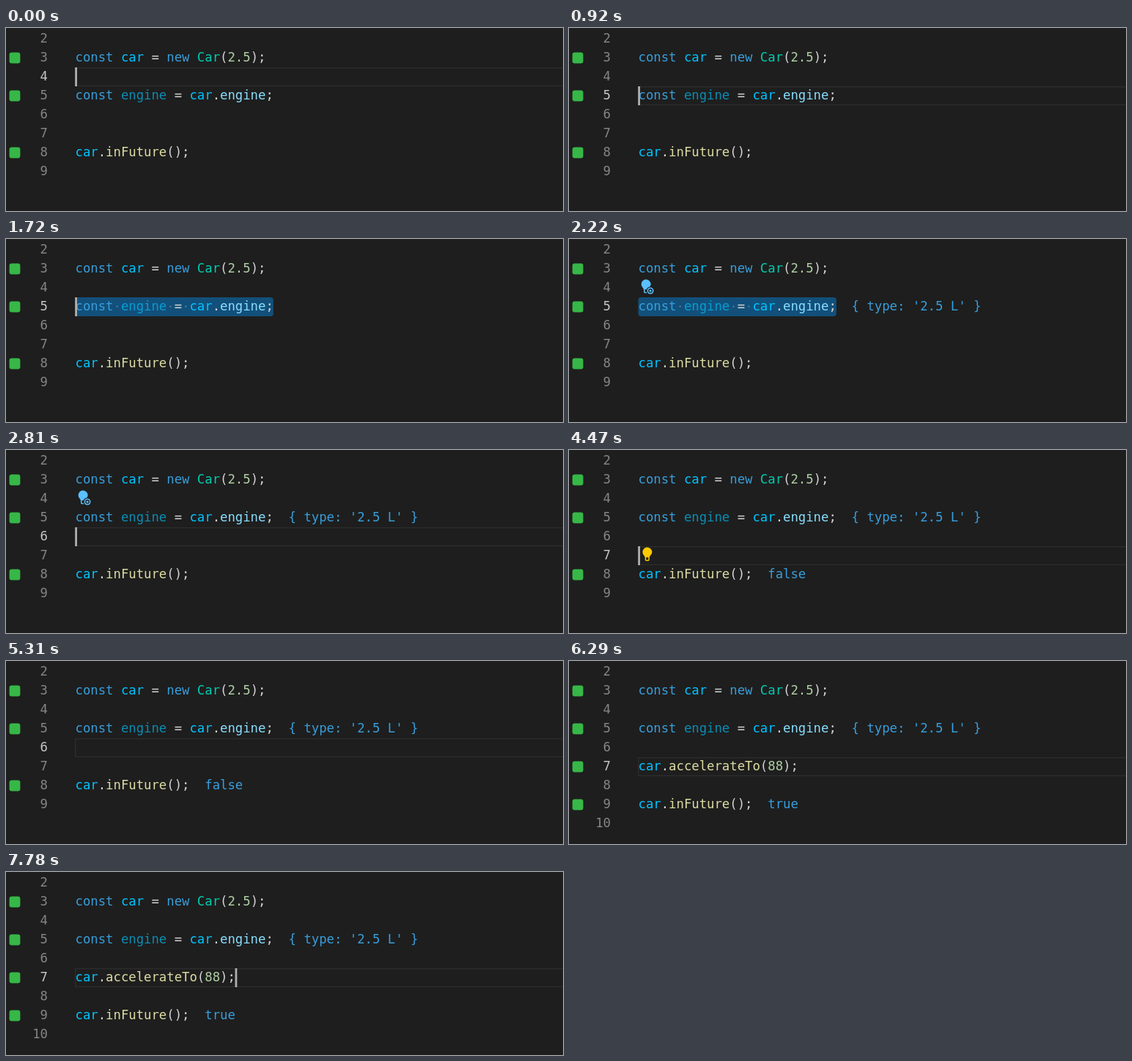
Animation of 760 by 251 pixels, one loop 8000 ms. Source, as an HTML page with a canvas:

```html
<!DOCTYPE html>
<html lang="en">
<head>
<meta charset="utf-8">
<title>Live code editor</title>
<style>
  html, body { margin: 0; width: 100%; height: 100%; overflow: hidden; background: #1e1e1e; }
  canvas { display: block; }
</style>
</head>
<body>
<canvas id="stage" width="760" height="251"></canvas>
<script>
const ctx = document.getElementById('stage').getContext('2d');
const LOOP = 8000, BLINK = 498, LINE = 26, LEFT = 94.5, CHAR = 10.397;
const FONT = '17.27px "DejaVu Sans Mono", Menlo, monospace';

const BG = '#1e1e1e', PLAIN = '#d4d4d4', KEY = '#389edb', NAME = '#00c4ff',
  CLASS = '#00ccaf', NUM = '#afcfa4', PROP = '#88deff', CALL = '#dcdca4';

const newCar = [['const', KEY], [' car', NAME], [' = ', PLAIN], ['new', KEY],
  [' Car', CLASS], ['(', PLAIN], ['2.5', NUM], [');', PLAIN]];
const engine = [['const', KEY], [' engine', NAME, 0.667], [' = ', PLAIN],
  ['car', NAME], ['.', PLAIN], ['engine', PROP], [';', PLAIN]];
const inFuture = [['car', NAME], ['.', PLAIN], ['inFuture', CALL], ['();', PLAIN]];
const accelerate = [['car', NAME], ['.', PLAIN], ['accelerateTo', CALL],
  ['(', PLAIN], ['88', NUM], [');', PLAIN]];

const lineY = line => 2 + (line - 2) * LINE;
const colX = col => LEFT + col * CHAR;
const plainText = parts => parts.map(p => p[0]).join('');
const endOf = parts => plainText(parts).length;

// Each move puts the caret on a line and column and restarts its blinking.
const moves = [
  { at: -80, line: 4 },
  { at: 920, line: 5 },
  { at: 1400, line: 5, col: endOf(engine) },
  { at: 1720, line: 5 },
  { at: 2810, line: 6 },
  { at: 2960, line: 7 },
  { at: 3110, line: 8, col: endOf(inFuture) },
  { at: 3830, line: 8 },
  { at: 4470, line: 7 },
  { at: 4800, line: 6 },
  { at: 5460, line: 7 },
  { at: 5780, line: 7, col: endOf(accelerate) }
];

function drawCode(line, parts, hint) {
  const y = lineY(line) + 18;
  let col = 0;
  for (const [str, color, alpha = 1] of parts) {
    ctx.globalAlpha = alpha;
    ctx.fillStyle = color;
    ctx.fillText(str, colX(col), y);
    col += str.length;
  }
  ctx.globalAlpha = 1;
  if (hint) {
    ctx.fillStyle = KEY;
    ctx.fillText(hint, colX(col + 2), y);
  }
}

function roundBox(x, y, w, h, r, color) {
  ctx.fillStyle = color;
  ctx.beginPath();
  ctx.roundRect(x, y, w, h, r);
  ctx.fill();
}

function disc(x, y, r, color) {
  ctx.fillStyle = color;
  ctx.beginPath();
  ctx.arc(x, y, r, 0, Math.PI * 2);
  ctx.fill();
}

function drawSelection(line, parts) {
  const str = plainText(parts);
  roundBox(LEFT, lineY(line), str.length * CHAR, LINE, 4, '#12507b');
  [...str].forEach((ch, i) => {
    if (ch === ' ') disc(colX(i + 0.5), lineY(line) + 12.5, 1.3, '#4a7596');
  });
}

function drawActiveLine(line) {
  const y = lineY(line);
  ctx.fillStyle = '#2c2c2c';
  ctx.fillRect(94, y, 666, 1.4);
  ctx.fillRect(94, y + LINE - 1.4, 666, 1.4);
  ctx.fillRect(94, y, 1.4, LINE);
}

function drawBulb(line, x, color, badge) {
  ctx.save();
  ctx.translate(LEFT, lineY(line));
  ctx.scale(1.44, 1.44);
  ctx.fillStyle = color;
  ctx.beginPath();
  ctx.arc(x, 5.5, 4.45, Math.PI * 0.78, Math.PI * 0.22);
  ctx.quadraticCurveTo(x + 2.1, 9.6, x + 2.1, 11);
  ctx.lineTo(x - 2.1, 11);
  ctx.quadraticCurveTo(x - 2.1, 9.6, x - 3.4, 8.3);
  ctx.fill();
  roundBox(x - 2.1, 9.8, 4.2, 4.2, 1.2, color);
  roundBox(x - 1.1, 10.6, 2.2, 2.4, 0.3, BG);
  if (badge) {
    disc(11.5, 11.8, 4, BG);
    disc(11.5, 11.8, 3.1, color);
    disc(11.5, 11.8, 2, BG);
    disc(11.5, 11.8, 1.1, color);
  }
  ctx.restore();
}

function draw(t) {
  const within = (a, b) => t >= a && t < b;
  const { at, line, col = 0 } = moves.filter(m => m.at <= t).pop();
  const caretOn = Math.floor((t - at) / BLINK) % 2 === 0;
  const split = t >= 5460, pasted = t >= 5780, rerun = t >= 5900;
  const last = split ? 9 : 8;

  ctx.fillStyle = BG;
  ctx.fillRect(0, 0, 760, 251);
  ctx.font = FONT;

  if (within(1400, 2810)) drawSelection(5, engine);
  else if (within(3110, 4470)) drawSelection(8, inFuture);
  else drawActiveLine(line);

  ctx.textAlign = 'right';
  for (let n = 2; n <= last + 1; n++) {
    ctx.fillStyle = n === line ? '#c6c6c6' : '#858585';
    ctx.fillText(n, 57, lineY(n) + 18);
  }
  ctx.textAlign = 'left';

  const marks = rerun ? [3, 5, 7, last] : [3, 5, last];
  for (const n of marks) roundBox(4.6, lineY(n) + 5.6, 14.8, 14.8, 3, '#37b748');

  drawCode(3, newCar);
  drawCode(5, engine, t >= 1750 && "{ type: '2.5 L' }");
  if (pasted) drawCode(7, accelerate);
  drawCode(last, inFuture, t >= 3850 && String(rerun));

  if (within(1960, 3350)) drawBulb(4, 7.3, '#5ac0ff', true);
  if (within(4090, 4710)) drawBulb(7, 8.5, '#ffc900', false);

  if (caretOn) {
    ctx.fillStyle = '#aeafad';
    ctx.fillRect(colX(col) - 0.3, lineY(line), 2.8, LINE);
  }
}

const start = performance.now();
function tick() {
  draw((performance.now() - start) % LOOP);
  requestAnimationFrame(tick);
}
tick();
</script>
</body>
</html>
```
